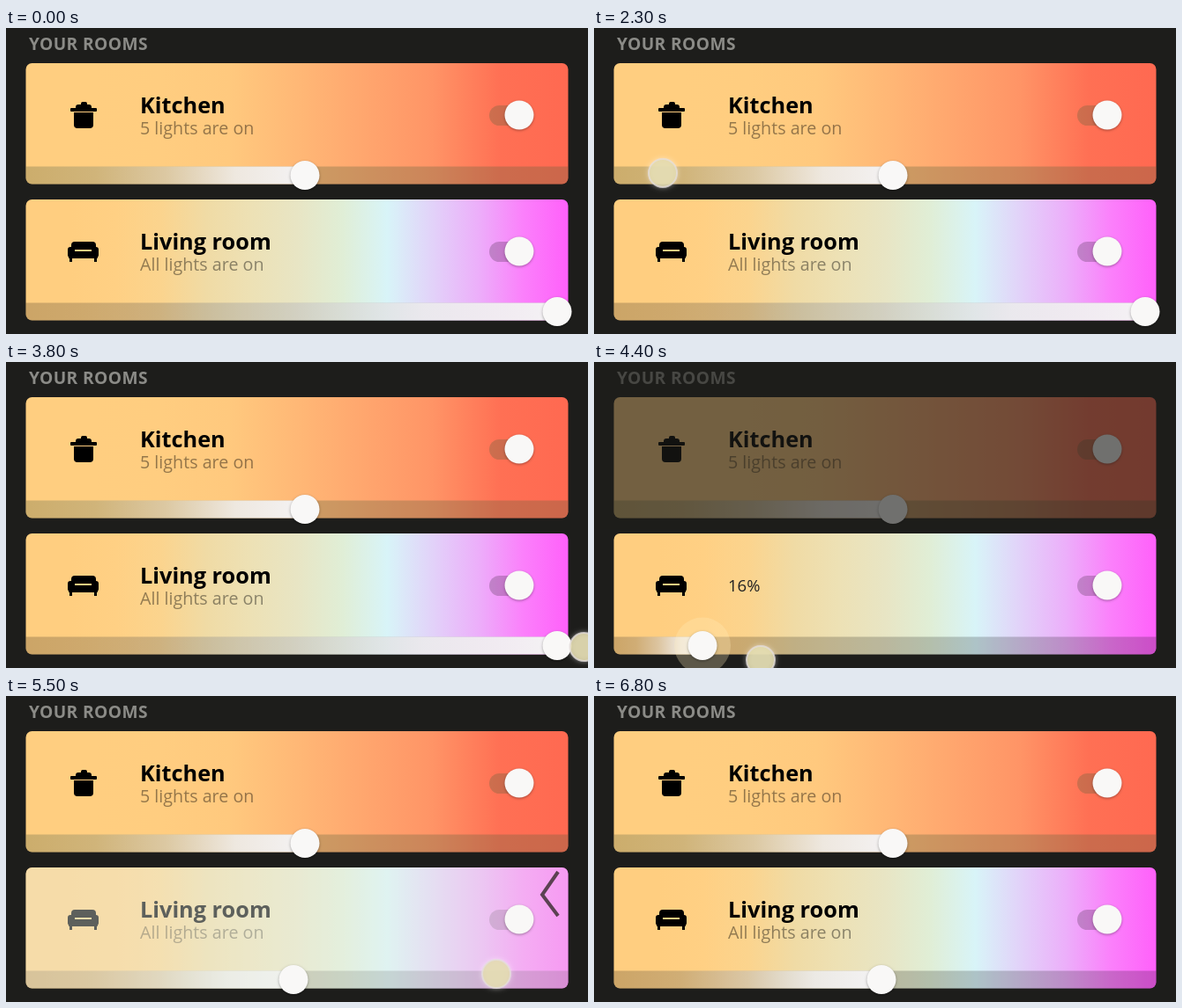
An HTML page with a canvas for the animation above (7300 ms loop, 660x348 px).

```html
<!DOCTYPE html>
<html lang="en">
<head>
<meta charset="utf-8">
<title>Room lights</title>
<style>
  html, body { margin: 0; height: 100%; overflow: hidden; background: #1d1d1b; }
  canvas { display: block; }
</style>
</head>
<body>
<canvas id="stage" width="660" height="348"></canvas>
<script>
const LOOP = 7300, STEP = 100;
const LEFT = 22.5, RIGHT = 637.5, WIDTH = RIGHT - LEFT, HEIGHT = 137.5, TRACK = 20;
const BACKGROUND = '#1d1d1b';
const FONT = '"Open Sans", "Noto Sans", sans-serif';
const ctx = document.getElementById('stage').getContext('2d');

// Timing helpers
const progress = (t, start, end) => Math.min(1, Math.max(0, (t - start) / (end - start)));
const smooth = p => p * p * (3 - 2 * p);
const easeOut = p => p * (2 - p);
const mix = (a, b, k) => a + (b - a) * k;

// Evenly spaced horizontal gradient
function ramp(from, to, colors) {
  const gradient = ctx.createLinearGradient(from, 0, to, 0);
  colors.forEach((color, i) => gradient.addColorStop(i / (colors.length - 1), color));
  return gradient;
}

function box(x, y, w, h, r, fill) {
  ctx.fillStyle = fill;
  ctx.beginPath();
  ctx.roundRect(x, y, w, h, r);
  ctx.fill();
}

function disc(x, y, r, fill) {
  ctx.fillStyle = fill;
  ctx.beginPath();
  ctx.arc(x, y, r, 0, 2 * Math.PI);
  ctx.fill();
}

function label(text, x, y, size, weight, fill) {
  ctx.font = `${weight} ${size}px ${FONT}`;
  ctx.fillStyle = fill;
  ctx.fillText(text, x, y);
}

function withAlpha(alpha, paint) {
  ctx.save();
  ctx.globalAlpha = alpha;
  paint();
  ctx.restore();
}

function knob(x, y) {
  ctx.save();
  ctx.shadowColor = 'rgba(0,0,0,.35)';
  ctx.shadowBlur = 3;
  ctx.shadowOffsetY = 1;
  disc(x, y, 16.5, '#f9f8f7');
  ctx.restore();
}

function pot() {
  box(85, 84, 7, 5, 2, '#000');
  box(79, 87, 18, 5, [3, 3, 0, 0], '#000');
  box(73, 91, 30, 4, 1, '#000');
  box(77, 96, 22, 18, [0, 0, 4, 4], '#000');
}

function sofa() {
  box(74, 243, 28, 9, [4, 4, 0, 0], '#000');
  box(71, 254, 33, 8, 1, '#000');
  for (const side of [0, 1]) {
    box(70 + side * 27, 249, 8, 12, 3, '#000');
    box(72 + side * 28, 261, 3, 5, 0, '#000');
  }
}

const kitchen = {
  y: 40, name: 'Kitchen', status: '5 lights are on', icon: pot, shade: 'rgba(88,96,62,.3)',
  fill: ramp(LEFT, RIGHT, ['#ffce80', '#ffce80', '#ffcd80', '#ffc97e', '#ffb876',
    '#ffa66e', '#ff9466', '#ff7054', '#ff6951'])
};
const living = {
  y: 195, name: 'Living room', status: 'All lights are on', icon: sofa, shade: 'rgba(0,0,0,.2)',
  fill: ramp(LEFT, RIGHT, ['#ffce80', '#ffce80', '#ffd084', '#fbd48e', '#f0dba5', '#ede1b5', '#e8e5c4',
    '#e0eed6', '#d8f4f8', '#e2d2f9', '#ecaffa', '#fb80fb', '#ff60fa'])
};
const glow = [0, .1, .4, .85, 1].map(alpha => `rgba(244,243,244,${alpha})`);

function drawCard({ y, name, status, icon, shade, fill }, value, dragging = 0, pale = 0) {
  const trackY = y + HEIGHT - TRACK;
  box(LEFT, y, WIDTH, HEIGHT, 7, fill);
  box(LEFT, trackY, WIDTH, TRACK, [0, 0, 7, 7], shade);
  box(LEFT, trackY, value - LEFT, TRACK, [0, 0, 0, 7], ramp(LEFT, value, glow));
  icon();
  withAlpha(1 - dragging, () => {
    label(name, 152, y + 57, 25.3, 700, '#000');
    label(status, 152, y + 81, 19.7, 400, 'rgba(0,0,0,.42)');
  });
  withAlpha(dragging, () => {
    label(Math.round((value - LEFT) / WIDTH * 100) + '%', 152, y + 66, 18.5, 400, '#222');
  });
  box(548, y + 48, 46, 23, 11.5, shade);
  withAlpha(pale, () => box(LEFT, y, WIDTH, HEIGHT, 7, '#e8f0e6'));
  knob(582, y + 59);
  withAlpha(dragging, () => disc(value, trackY + 10, 32, 'rgba(255,235,185,.28)'));
  knob(value, trackY + 10);
}

function drawTouch(x, y) {
  ctx.shadowColor = 'rgba(255,255,255,.7)';
  ctx.shadowBlur = 6;
  disc(x, y, 16, 'rgba(226,218,172,.85)');
  ctx.shadowBlur = 0;
  ctx.strokeStyle = 'rgba(228,222,220,.75)';
  ctx.lineWidth = 2;
  ctx.stroke();
}

function drawChevron(x, y) {
  ctx.strokeStyle = 'rgba(40,34,28,.75)';
  ctx.lineWidth = 4;
  ctx.beginPath();
  ctx.moveTo(x + 18, y - 26);
  ctx.lineTo(x, y);
  ctx.lineTo(x + 18, y + 24);
  ctx.stroke();
}

// Moves a shape along a line, slowing down and fading out at the end
function glide(t, paint, start, end, from, to) {
  if (t < start || t >= end) return;
  const p = progress(t, start, end), k = easeOut(p);
  withAlpha(Math.min(1, (1 - p) / .3), () => paint(mix(from[0], to[0], k), mix(from[1], to[1], k)));
}

// The living room slider: down to almost nothing, then up to the middle
const sliderAt = t => t < 4200
  ? mix(625, 52, smooth(progress(t, 3800, 4200)))
  : mix(52, 326, smooth(progress(t, 4200, 4800)));

// The finger runs slightly ahead of the slider it drags
function dragTouch(t) {
  if (t < 3800 || t >= 5100) return;
  const x = sliderAt(t + 100) + 120 * (1 - progress(t, 3800, 4200));
  const y = mix(324, 339, progress(t, 3800, 4400));
  withAlpha(1 - progress(t, 4900, 5100), () => drawTouch(x, y));
}

function draw(t) {
  const dim = progress(t, 3800, 4000) - progress(t, 5100, 5400);
  const pale = .4 * (progress(t, 5300, 5500) - progress(t, 5500, 6100));
  ctx.fillStyle = BACKGROUND;
  ctx.fillRect(0, 0, 660, 348);
  ctx.letterSpacing = '0.4px';
  label('YOUR ROOMS', 26, 25, 19.2, 700, '#8b8b87');
  ctx.letterSpacing = '0px';
  drawCard(kitchen, 339);
  withAlpha(dim * .62, () => box(0, 0, 660, 190, 0, BACKGROUND));
  drawCard(living, sliderAt(t), dim, pale);

  dragTouch(t);
  glide(t, drawTouch, 700, 1700, [655, 185], [350, 173]);
  glide(t, drawChevron, 1100, 1700, [660, 92], [509, 92]);
  glide(t, drawTouch, 2200, 3200, [10, 168], [368, 152]);
  glide(t, drawChevron, 2700, 3200, [112, 76], [0, 76]);
  glide(t, drawTouch, 5400, 6400, [652, 318], [147, 308]);
  glide(t, drawChevron, 5400, 6800, [640, 226], [408, 226]);
}

function tick() {
  const t = performance.now() % LOOP;
  draw(Math.floor(t / STEP) * STEP);
  requestAnimationFrame(tick);
}
tick();
</script>
</body>
</html>
```
